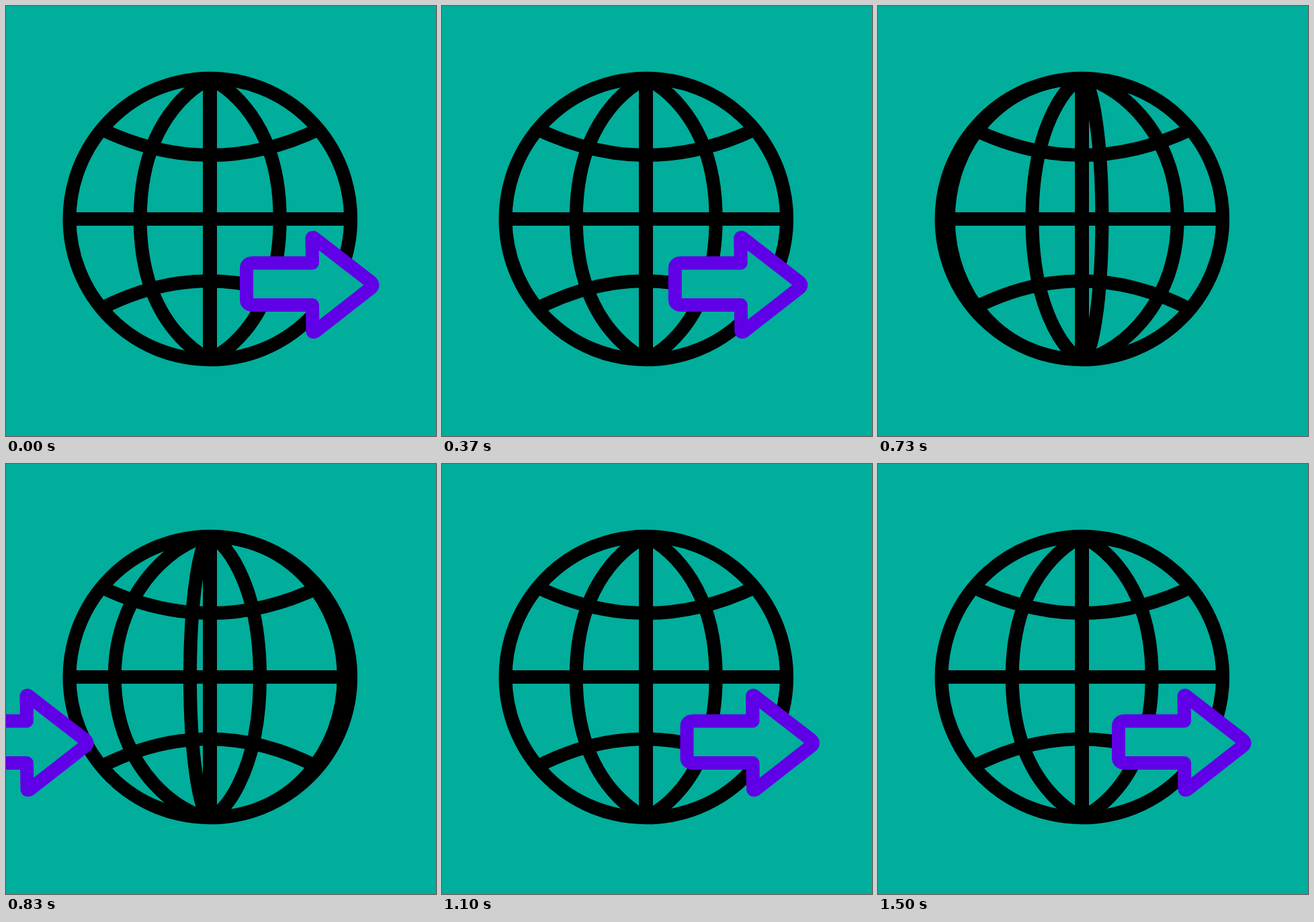
An HTML page for the animation above (1670 ms loop, 640x640 px).

```html
<!DOCTYPE html>
<html lang="en">
<head>
<meta charset="utf-8">
<title>Globe and arrow</title>
<style>
  html, body { margin: 0; width: 100%; height: 100%; overflow: hidden; background: #00ae9b; }
  svg { display: block; width: 100vw; height: 100vh; }
  .globe { fill: none; stroke: #000; stroke-width: 20; }
  .arrow { fill: #00ae9b; stroke: #5f00e6; stroke-width: 20; stroke-linejoin: round; }
</style>
</head>
<body>
<svg viewBox="0 0 640 640">
  <clipPath id="disc"><circle cx="303.8" cy="317" r="219"/></clipPath>
  <g class="globe">
    <g id="meridians" clip-path="url(#disc)"><path/><path/><path/><path/></g>
    <path d="M303.5 108V526" stroke-width="21"/>
    <path d="M94 317H514"/>
    <path d="M141 183Q304 261 467 183M141 450.5Q304 367 467 452.5"/>
    <circle cx="303.8" cy="317" r="209.3"/>
  </g>
  <path id="arrow" class="arrow" d="M368 382.5H456L455.5 345.5Q456 344 458 345L542 410Q549 415.5 542 420.5L460 484.5Q457 486 456.5 484L456 445H368Q358 445 358 437V390.5Q358 382.5 368 382.5Z"/>
</svg>
<script>
const LOOP = 1670, FRAME = 100 / 3;
const CX = 303.7, CY = 317, R = 209;
const REST = 104;                           // bulge of the resting meridians
const BULGES = [-237, -REST, 0, REST, 237];
const SPIN = { from: 13, to: 27, step: 7 }; // in frames

const arrow = document.getElementById('arrow');
const lines = [...document.querySelectorAll('#meridians path')];

const easeInOut = u => u < 0.5 ? 2 * u * u : 1 - 2 * (1 - u) ** 2;

// A pointed lens at rest that rounds towards an ellipse while it turns.
function meridian(dx) {
  const x = CX + dx, top = CY - R, bottom = CY + R;
  const round = 0.0115 * Math.abs(Math.abs(dx) - REST);
  const poleX = CX + dx * 0.552 * round;
  const sideY = 43 + 51 * round;
  return `M${CX} ${top}C${poleX} ${top} ${x} ${top + sideY} ${x} ${CY}` +
         `S${poleX} ${bottom} ${CX} ${bottom}`;
}

function arrowShift(k) {
  if (k <= 2) return 0;
  if (k <= 8) return -72 * easeInOut((k - 2) / 6);
  if (k < 19) return -72 + 380 * ((k - 8) / 7.5) ** 2;
  if (k <= 35) {
    const left = 35 - k;
    return 49 - 14.7 * left - 3.27 * left * left;
  }
  return k < 45 ? 49 * ((45 - k) / 10) ** 2.2 : 0;
}

function draw(ms) {
  const k = Math.floor((ms + 3.4) / FRAME);
  const spinning = k > SPIN.from && k < SPIN.to;
  const p = spinning ? (k - SPIN.from) / SPIN.step % 1 : 0;

  lines.forEach((line, i) => {
    const dx = BULGES[i] + (BULGES[i + 1] - BULGES[i]) * p;
    line.setAttribute('d', meridian(dx));
    line.style.display = i === 0 && p === 0 ? 'none' : '';
  });
  arrow.setAttribute('transform', `translate(${arrowShift(k).toFixed(2)} 0)`);
}

const start = performance.now();
function tick() {
  draw((performance.now() - start) % LOOP);
  requestAnimationFrame(tick);
}
tick();
</script>
</body>
</html>
```
